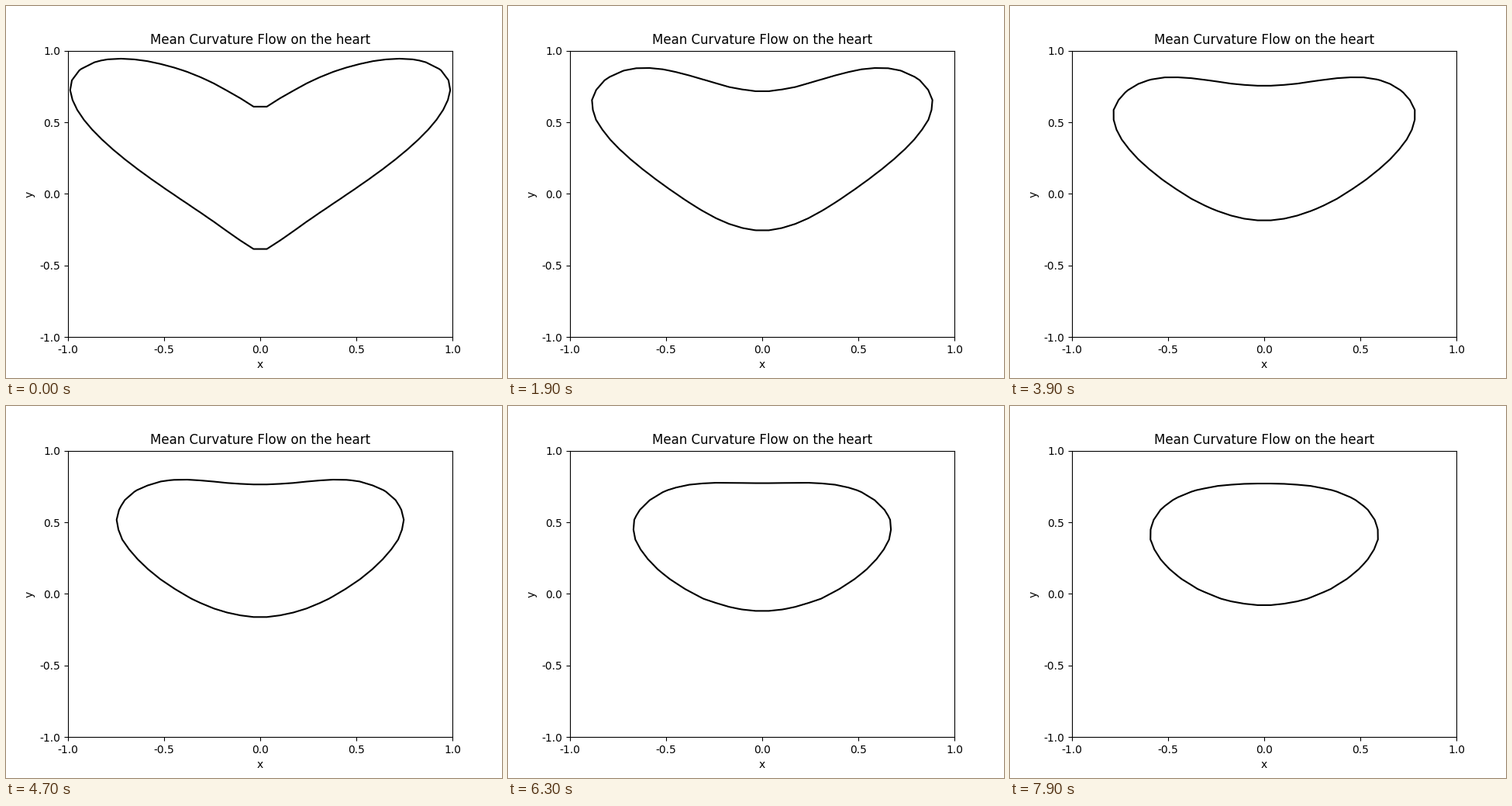
Animation, 640 px wide and 480 px high, one loop 8 s. Source, as a matplotlib script:

```python
import numpy as np
import matplotlib.pyplot as plt
from matplotlib.animation import FuncAnimation

plt.rcParams["axes.unicode_minus"] = False

FRAMES, INTERVAL = 80, 100
H = 2 / 29            # grid spacing, 30 nodes across the visible square
DT = H ** 2 / 4       # time step of the flow
WARMUP = 2            # steps taken before the first frame

# The grid reaches past the axes so that its edges stay clear of the front
axis = H * (np.arange(50) - 24.5)
X, Y = np.meshgrid(axis, axis)


def heart(x, y):
    return x ** 2 + (2 * y - 1.5 * np.abs(x) ** (2 / 3)) ** 2 - 1


def step(u):
    """One explicit step of the level set curvature flow."""
    uy, ux = np.gradient(u, H)
    norm = np.hypot(ux, uy) + 1e-9
    curvature = (np.gradient(ux / norm, H, axis=1)
                 + np.gradient(uy / norm, H, axis=0))
    speed = curvature * (np.abs(ux) + np.abs(uy))
    new = u.copy()
    new[1:-1, 1:-1] += DT * speed[1:-1, 1:-1]
    return new


def evolve(u):
    for _ in range(WARMUP):
        u = step(u)
    fields = []
    for _ in range(FRAMES):
        fields.append(u)
        u = step(u)
    return fields


fields = evolve(heart(X, Y))
fig, ax = plt.subplots(figsize=(6.4, 4.8), dpi=100)


def draw(frame):
    for old in list(ax.collections):
        old.remove()
    front = ax.contour(X, Y, fields[frame], levels=[0], colors="black",
                       linewidths=1.5)
    ax.set(xlim=(-1, 1), ylim=(-1, 1))
    return [front]


ticks = np.linspace(-1, 1, 5)
labels = [f"{v:.1f}" for v in ticks]
ax.set(xlabel="x", ylabel="y", title="Mean Curvature Flow on the heart")
ax.set_xticks(ticks, labels)
ax.set_yticks(ticks, labels)

anim = FuncAnimation(fig, draw, frames=FRAMES, interval=INTERVAL, repeat=True,
                     repeat_delay=0, blit=False)
plt.show()
```
